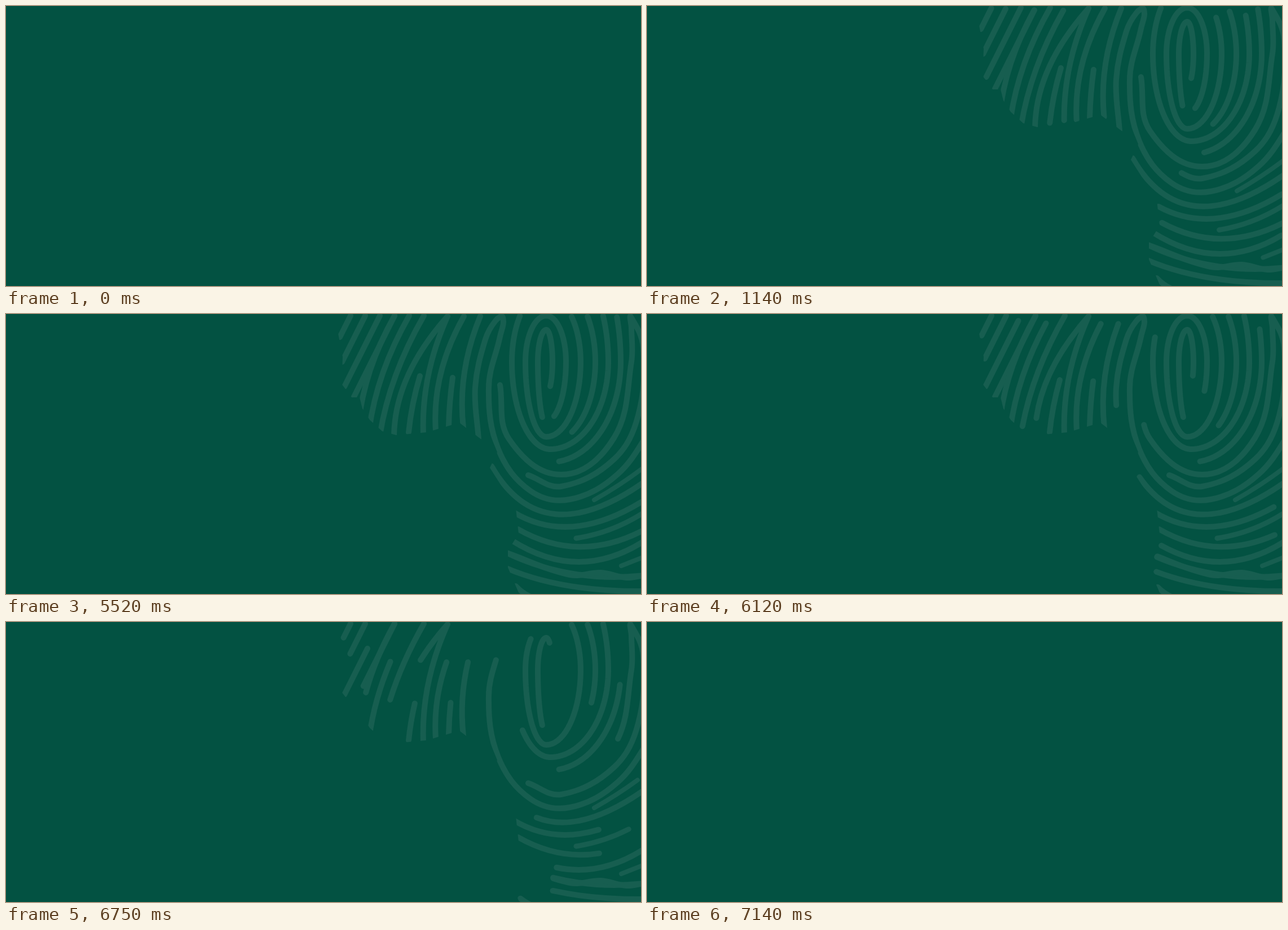
An HTML page that plays this animation: 1126 by 497 pixels, repeating every 7350 ms.

```html
<!DOCTYPE html>
<html lang="en">
<head>
<meta charset="utf-8">
<title>Ridges</title>
<style>
  html, body { margin: 0; width: 100%; height: 100%; overflow: hidden; background: #035242; }
  svg { display: block; width: 100%; height: 100%; }
  #ridges { fill: none; stroke: #175e50; stroke-width: 10; stroke-linecap: round; stroke-linejoin: round; }
</style>
</head>
<body>
<svg viewBox="0 0 1126 497">
  <clipPath id="coast">
    <path d="M580 0 L589 35 597 76 595 124 613 148 627 148 632 168 645 188 667 208 692 215
      746 210 804 193 842 222 860 218 871 245 858 273 904 345 909 390 890 420 890 450 910 497 H1126 V0 Z"/>
  </clipPath>
  <g clip-path="url(#coast)"><g id="ridges"></g></g>
</svg>
<script>
const LOOP = 7350, STEP = 30;
const IN = 510, FULL = 1770, HALF = 118;
const OUT = 5520, GONE = 7140;
const layer = document.getElementById('ridges');
const ridges = [];

// Every ridge runs in its drawing direction.
function ridge(d, width) {
  const path = document.createElementNS('http://www.w3.org/2000/svg', 'path');
  path.setAttribute('d', d);
  if (width) path.setAttribute('stroke-width', width);
  layer.append(path);
  ridges.push({ path, length: path.getTotalLength() });
}

// Smooth curve through a few key points.
function curve(text) {
  const pts = text.split(' ').map(p => p.split(',').map(Number));
  const at = i => pts[Math.max(0, Math.min(pts.length - 1, i))];
  const handle = (i, h) => {
    const [ax, ay] = at(i - 1), [bx, by] = at(i + 1);
    const d = h / Math.hypot(bx - ax, by - ay);
    return [at(i)[0] + (bx - ax) * d, at(i)[1] + (by - ay) * d];
  };
  return pts.slice(1).reduce((d, p, i) => {
    const h = 0.36 * Math.hypot(p[0] - pts[i][0], p[1] - pts[i][1]);
    return `${d}C${handle(i, h)} ${handle(i + 1, -h)} ${p}`;
  }, 'M' + pts[0]);
}

// Spiral of quarter ellipses around (cx, 85), turning bottom, right, top, left;
// radii holds one reach per turn, from and to count quarter turns.
function whorl(cx, radii, from, to) {
  const pts = Array.from({ length: 97 }, (_, i) => {
    const turn = from + (to - from) * i / 96, q = Math.floor(turn);
    const pair = [radii[q], radii[q + 1]];
    const [ry, rx] = q % 2 ? pair.reverse() : pair;
    const a = turn * Math.PI / 2;
    return `${cx + rx * Math.sin(a)},${85 + ry * Math.cos(a)}`;
  });
  ridge('M' + pts.join('L'));
}

// Fan: straight ridges, then bowed ones.
const top0 = i => 611 + 26 * i;
function blade(i, x, y, sag) {
  const ends = [`${x} ${y}`, `${top0(i)} 3`];
  if (i && i % 2 === 0) ends.reverse();
  ridge(`M${ends[0]}Q${(x + top0(i)) / 2 - sag} ${(y + 3) / 2} ${ends[1]}`);
}
for (let i = 0; i < 4; i++) blade(i, top0(i) - 19 - 22 * i, 41 + 44 * i, 0);
for (let i = 3; i < 6; i++) blade(i, 568 + 19 * i, 165 + 10 * i, 22);
ridge('M688 217Q689 110 783 4Q736 109 740 214');
ridge('M734 110Q719 160 714 210');
ridge('M812 4Q755 105 762 207');
ridge('M792 113Q786 156 785 200');
ridge('M841 4Q800 103 811 202');

// Whorl
whorl(958, [56, 11, 57, 15, 111], 0.44, 3.69);
whorl(958, [105, 35, 82, 37, 133, 61, 119], 0.26, 5.47);
whorl(965, [142, 80, 143], 0.32, 1.38);
whorl(965, [0, 0, 133, 68, 155, 103, 198], 2.58, 5.27);
whorl(965, [178, 125, 245], 1.21, 0.08);

// Outer turns
ridge(curve('876,126 892,222 985,285 1078,220 1109,85 1109,25 1108,5 1130,60 1121,180 1078,258 985,306 926,286'));
ridge(curve('838,222 832,130 850,45 868,12 881,6 876,40 856,130 873,240 930,314 1000,329 1085,284 1150,195'));

// Base
ridge('M861 270Q951 428 1136 295');
ridge('M1158 250Q1110 292 1043 330', 8);
ridge('M1126 334Q1000 411 902 353');
ridge('M1149 340Q1085 387 1011 398', 9);
ridge('M1128 385Q1015 443 908 382');
ridge('M897 402Q1015 477 1130 404');
ridge('M888 424Q1000 478 1132 464');
ridge(curve('888,424 1000,463 1055,459 1100,468 1132,464'));
ridge('M1149 424L1091 447', 8);
ridge('M887 451Q985 493 1130 492');
ridge('M904 483Q914 494 930 502');

const drawn = t => t >= FULL ? 1 : t < IN ? 0 : 1 - 2 ** (-(t - IN) / HALF);

function erased(t) {
  const x = Math.max(0, Math.min(1, (t - OUT) / (GONE - OUT)));
  return 1 - Math.sqrt(1 - x * x);
}

function render(time) {
  const t = Math.floor((time % LOOP) / STEP) * STEP;
  const a = erased(t), b = drawn(t);
  layer.style.display = b > a ? '' : 'none';
  for (const { path, length } of ridges) {
    path.setAttribute('stroke-dasharray', `${length * (b - a)} ${length * 3}`);
    path.setAttribute('stroke-dashoffset', -length * a);
  }
}

const start = performance.now();
function tick() {
  render(performance.now() - start);
  requestAnimationFrame(tick);
}
tick();
</script>
</body>
</html>
```
